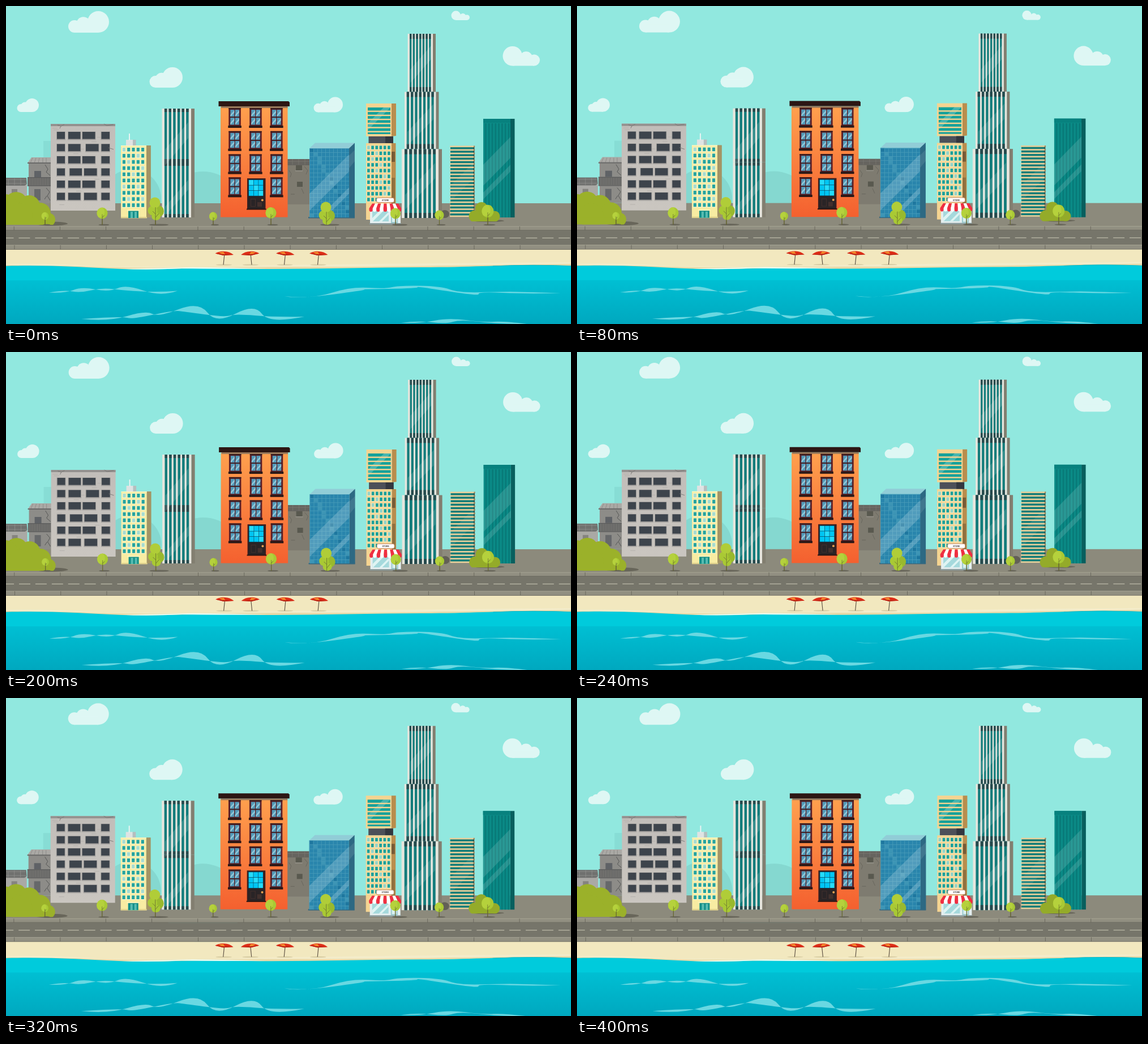
Recreate the animation shown at these times as an HTML page with a canvas. Size 998x561 px, loop 440 ms.

```html
<!DOCTYPE html>
<html lang="en">
<head>
<meta charset="utf-8">
<title>Seaside street</title>
<style>
html, body { margin: 0; width: 100%; height: 100%; overflow: hidden; background: #91e8df; }
canvas { display: block; }
</style>
</head>
<body>
<canvas id="stage" width="998" height="561"></canvas>
<script>
const g = document.getElementById('stage').getContext('2d');

const box = (color, x, y, w, h) => { g.fillStyle = color; g.fillRect(x, y, w, h); };
const shape = (color, d) => { g.fillStyle = color; g.fill(new Path2D(d)); };
const line = (color, width, d) => { g.strokeStyle = color; g.lineWidth = width; g.stroke(new Path2D(d)); };
const oval = (color, x, y, rx, ry = rx) => {
  g.fillStyle = color;
  g.beginPath();
  g.ellipse(x, y, rx, ry, 0, 0, 7);
  g.fill();
};
const fade = (y1, y2, from, to) => {
  const f = g.createLinearGradient(0, y1, 0, y2);
  f.addColorStop(0, from);
  f.addColorStop(1, to);
  return f;
};
const times = (n, draw) => { for (let i = 0; i < n; i++) draw(i); };

function cloud(x, y, w, h, flip) {
  g.save();
  g.translate(flip ? x + w : x, y);
  g.scale(flip ? -1 : 1, 1);
  const c = '#def7f4';
  oval(c, w - h / 2, h / 2, h / 2);
  oval(c, w * .37, h * .6, h * .33);
  oval(c, h * .29, h * .71, h * .29);
  box(c, h * .29, h * .62, w - h * .79, h * .38);
  g.restore();
}

function backdrop() {
  box('#91e8df', -9, -9, 1020, 380);
  cloud(110, 9, 72, 38);
  cloud(253.5, 108, 58.5, 36);
  cloud(19.5, 163, 38.5, 24);
  cloud(543.5, 160.5, 51.5, 27);
  cloud(786.5, 8.5, 32.5, 16.5, true);
  cloud(877.5, 71, 65.5, 34.5, true);
  oval('#85d8d0', 222, 340, 52);
  oval('#85d8d0', 348, 362, 70);
  box('#87ddd5', 66, 238, 14, 90);
  box('#8c8a7c', -9, 348, 1020, 42);
}

function oldHouses() {
  box('#aaa9a5', -9, 315, 46, 45);
  shape('#70716f', 'M-9 303H36L37 314 33 317H-9Z');
  line('#949491', .7, 'M-9 306H35M-9 313H36M4 306V316M15 304V316M26 304V316');
  box('#85837f', 10, 323, 10, 9);
  box('#8d8c88', 40, 275, 41, 73);
  shape('#aaa9a5', 'M45 267H80V277H38Z');
  line('#83827e', .7, 'M47 268L43 277M53 268L50 277M59 268L57 277M65 268V277M71 268V277');
  box('#6a6a69', 38, 276, 42, 2);
  box('#5f6266', 50, 291, 12, 11);
  box('#777673', 38, 302, 41, 15);
  times(14, i => box('#595a5a', 39 + i * 2.9, 303, .9, 13));
  box('#595a5a', 38, 302, 41, 1.2);
  box('#666665', 38, 316, 41, 2);
  box('#66686a', 50, 323, 11, 20);
  line('#565756', 1, 'M69 280L74 288 71 293 78 299M71 321L77 328 73 335 78 343M72 335L68 341');

  // Broken windows shift slightly between floors.
  const rows = [[90, 110, 135], [90, 110, 141], [90, 110, 135], [90, 112.5, 138], [90, 110, 135], [90, 110, 138]];
  box(fade(208, 361, '#c1bdb9', '#cac6c0'), 79, 208, 114, 153);
  box('#94918f', 79, 208, 114, 4);
  times(20, i => box('#b3afab', 82 + i * 47 % 99, 215 + i * 37 % 140, 9, .9));
  rows.forEach((xs, row) => {
    const y = 222 + row * 21.5;
    [...xs, 168.5].forEach((x, i) => {
      const w = [14, 21.5, 22.5, 14.5][i];
      box('#a5a29f', x - 1, y - .5, w + 2, 15);
      box('#3d444c', x, y, w, 12.6);
    });
  });
  line('#777573', .9, 'M91 210L97 212 103 209M97 212L95 216M173 208L178 211 190 209M181 250L190 253');

  box('#7e7b70', 497, 280, 40, 70);
  box('#66645f', 497, 270, 39, 11);
  line('#7d7b74', .7, 'M498 274H536M506 270V280M517 270V280M528 270V280');
  box('#59594f', 512, 281, 11, 9);
  box('#59594f', 514, 310, 10, 9);
  line('#68665d', 1, 'M500 290L504 296 502 302M527 283L533 290 530 297M503 332H510M522 322L526 331');
  box('#96938a', 511, 290, 13, 1.5);
}

function creamOffice() {
  box('#dfe3e3', 212, 236, 12, 11);
  box('#b6bebe', 224, 236, 5.5, 11);
  box('#e9f4f3', 217, 225, 2, 12);
  box('#9aa77a', 248, 246, 8, 127);
  box('#a49465', 248, 246, 7.5, 127);
  box('#f8eca2', 203, 246, 45, 128);
  box('#fff7c2', 203, 246, 45, 1.5);
  times(50, i => {
    const x = 205.8 + i % 5 * 8.3, y = 250 + (i / 5 | 0) * 10.9;
    box('#fff9d5', x - .8, y - .7, 6.8, 8.4);
    box(i * 7 % 11 < 2 ? '#a5dbd0' : '#25a39d', x, y, 5.2, 6.6);
  });
  box('#e0d28c', 203, 372, 46, 2.5);
  box('#fff7c2', 214, 359.5, 22, 2);
  box('#128e88', 216, 361.5, 18, 12.5);
  box('#59bcb2', 220, 363, 4, 11);
  box('#59bcb2', 227, 363, 4, 11);
}

function tower(x, y, w, h, n, side, rim, cap) {
  const inner = w - side - rim * 2, pitch = inner / (n - .42);
  box('#e6e5dd', x, y, w - side, h);
  box('#827e70', x + w - side, y, side, h);
  times(n, i => {
    const sx = x + rim + i * pitch, sw = pitch * .58;
    box('#137c7b', sx, y, sw, h);
    box('#27494c', sx, y, sw, cap);
    box('#27494c', sx, y + h - cap, sw, cap);
  });
}

function towers() {
  tower(275.5, 181, 57.5, 95, 6, 6, 4.4, 6);
  tower(275.5, 276, 57.5, 97, 6, 6, 4.4, 6);
  shape('#ffffff25', 'M281 253L322 205V233L281 281ZM281 354L322 307V324L281 370Z');
  tower(709.5, 49, 49.5, 103, 7, 5, 3.5, 9);
  tower(704, 151.5, 60.5, 101, 7, 5, 3.8, 9);
  tower(699, 252.5, 71, 121.5, 7, 6, 5, 9);
  shape('#ffffff24', 'M714 112L751 70V94L714 136ZM709 222L755 173V200L709 246ZM705 333L758 277V304L705 359Z');
}

function sashWindow(x, y) {
  box('#5c2028', x, y, 21.5, 33);
  box('#35191b', x, y, 21.5, 2);
  times(4, i => {
    const px = x + 3 + i % 2 * 8.5, py = y + 3 + (i >> 1) * 14;
    box('#5299b8', px, py, 7, 12.5);
    shape('#92c7d8', `M${px} ${py + 9}L${px + 7} ${py + 1}v4L${px} ${py + 12.5}Z`);
  });
  box('#3b191c', x + 2, y + 15.3, 17.5, 1.5);
  box('#2c1817', x - 1, y + 31, 23.5, 4);
}

function orangeHouse() {
  box(fade(178, 373, '#ffa04e', '#f4602f'), 379, 178, 118.5, 194.5);
  box('#9a7a5c', 380, 177, 117.5, 3);
  shape('#2c1714', 'M375.5 168H499L501 170V177H375.5Z');
  times(12, i => {
    if (i !== 10) sashWindow(393.3 + i % 3 * 36.9, 180 + (i / 3 | 0) * 40.8);
  });
  box('#3a1f1f', 426, 304, 32.5, 55);
  box('#292426', 428, 335, 28, 23);
  box('#0a3e55', 428, 306, 26.5, 29.5);
  times(9, i => box(i % 4 ? '#00c6f4' : '#24dcfa', 429 + i % 3 * 8.6, 307 + (i / 3 | 0) * 9.5, 8, 8.8));
  box('#43302d', 432, 340, 9, 14);
  box('#43302d', 444, 346, 8, 8);
  box('#292426', 433, 341, 7, 12);
  oval('#e7a052', 452.8, 342.5, 2);
  box('#2c1714', 425, 357.5, 34.5, 2);
}

function glassBlock() {
  box('#39697e', 534, 372, 82, 2.5);
  shape('#91cdd7', 'M536 251L546 241.5H616L606 251Z');
  shape('#2d6983', 'M606 251L616 241.5V373H606Z');
  box('#2985ac', 536, 251, 70, 122);
  times(16, i => box(i % 3 ? '#3d95b5' : '#1e779f', 536.5 + i * 3 % 10 * 7, 251 + i * 5 % 17 * 7.2, 6.5, 6.5));
  times(10, i => box('#4a9dba', 536 + i * 7, 251, .8, 122));
  times(17, i => box('#4a9dba', 536, 251 + i * 7.2, 70, .8));
  shape('#ffffff30', 'M536 331L606 262V292L536 361ZM553 373L606 320V331L564 373Z');
  shape('#ffffff18', 'M606 264L616 254V274L606 286Z');
}

function tanTower() {
  shape('#b98d4d', 'M681 172H689V229L681 230Z');
  box('#b98d4d', 681, 242, 7.5, 135);
  box('#775b37', 681, 257, 6, 18);
  box('#90703f', 681, 303, 6, 62);
  box('#f5d491', 636, 172, 45, 58);
  box('#4d5058', 640.5, 230, 43.5, 12);
  box('#33373f', 670, 230, 14, 12);
  box('#16a19a', 639, 179, 40, 47);
  shape('#ffffff38', 'M639 207L667 179H679L639 219Z');
  times(6, i => box('#f5d491', 638, 184.5 + i * 7.2, 42, 2.4));
  box('#f5d491', 636, 242, 45, 135);
  times(60, i => {
    const x = 638 + i % 6 * 7.2, y = 246.5 + (i / 6 | 0) * 10.2;
    box('#fff0c5', x - .7, y - .6, 6, 7.9);
    box(i * 5 % 13 < 2 ? '#94d2c6' : '#1c9f98', x, y, 4.7, 6.3);
  });
}

function shop() {
  box('#e5eff0', 643, 358, 54, 27);
  box('#8a9a9b', 642, 383, 56, 2.5);
  box('#a5d9dc', 647, 361, 29, 19);
  shape('#dff4f3', 'M647 374L660 361H667L648 380H647ZM659 380L676 363V368L664 380Z');
  box('#9bc9cd', 680, 361, 12, 22);
  box('#d9f0f0', 682, 363, 8, 18);
  times(9, i => {
    const t = 647 + i * 5.1, b = 641.5 + i * 6.3;
    shape(i % 2 ? '#ffffff' : '#ef2f42', `M${t} 348.5h5.1L${b + 6.3} 357v2.5a3.15 3.5 0 0 1-6.3 0V357Z`);
  });
  g.beginPath();
  g.roundRect(654.5, 338.5, 31, 8, 2.5);
  g.fillStyle = '#fff';
  g.fill();
  g.strokeStyle = '#c78863';
  g.lineWidth = 1;
  g.stroke();
  g.fillStyle = '#443b3b';
  g.font = 'bold 4px Roboto, sans-serif';
  g.textAlign = 'center';
  g.fillText('STORE', 670, 344);
}

function rightBlocks() {
  box('#2d5d57', 824, 248, 3.5, 124);
  box('#137c77', 785, 247, 40, 125);
  shape('#ffffff18', 'M785 317L825 277V305L785 345Z');
  times(21, i => {
    box('#ead09b', 784, 246.5 + i * 6.15, 42, 2.6);
    box('#a98b5d', 826, 246.5 + i * 6.15, 2.2, 2.6);
  });
  box('#085f5e', 891, 199, 7.5, 174);
  box('#0b8b87', 843, 199, 48, 174);
  times(8, i => box('#087a78', 846 + i * 5.8, 207, 2.7, 166));
  box('#07817e', 843, 199, 48, 7);
  shape('#ffffff20', 'M843 280L891 231V268L843 317ZM843 329L891 280V292L843 341Z');
}

function tree(x, y, r, foot = 386) {
  oval('#68665a', x + 3, foot, r, 1.3);
  box('#5d5136', x - .6, y, 1.2, foot - y);
  oval('#a9c934', x, y, r, r * 1.06);
  g.save();
  g.beginPath();
  g.ellipse(x, y, r, r * 1.06, 0, 0, 7);
  g.clip();
  oval('#b5d13c', x - r * .45, y - r * .2, r * .9, r);
  g.restore();
  line('#6d7430', .8, `M${x} ${y + r * .2}V${foot}M${x} ${y + r * .8}l${r * .35} ${-r * .4}`);
}

function tallTree(x, y) {
  oval('#68665a', x + 6, 386, 17, 1.6);
  box('#5d5136', x - .7, y, 1.4, 386 - y);
  oval('#99b92e', x + 6, y + 15, 9, 10);
  oval('#a9c934', x - 5, y + 14, 8.5);
  oval('#b0cd38', x - 1, y, 9.5);
  oval('#a9c934', x + 1, y + 24, 8, 7);
  line('#6d7430', .9, `M${x} ${y + 8}V386M${x} ${y + 26}l6 -7M${x} ${y + 20}l-5 -5`);
}

function bush(color, base, x1, x2, lobes) {
  g.save();
  g.beginPath();
  g.rect(-9, 0, 1020, base);
  g.clip();
  lobes.forEach(([x, y, r]) => oval(color, x, y, r));
  box(color, x1, base - 12, x2 - x1, 12);
  g.restore();
}

function greenery() {
  oval('#68665a', 80, 384, 29, 3.5);
  bush('#9bb12a', 386, -9, 80, [[18, 348, 20], [-2, 355, 23], [41, 353, 19], [60, 366, 19], [75, 377, 12], [25, 370, 22]]);
  tree(69, 370.5, 6.3, 386);
  tree(170, 365.5, 9.5);
  tallTree(264, 347);
  tree(366, 371, 7);
  tree(468, 365, 9.5);
  tallTree(566, 355);
  oval('#68665a', 696, 386, 13, 1.6);
  tree(688, 366, 9);
  oval('#626056', 775, 367, 8, 7);
  tree(765.5, 369, 8);
  oval('#68665a', 852, 379, 28, 2);
  bush('#94ab29', 380, 824, 866, [[840, 357, 11], [828, 371, 10.5], [848, 367, 12], [863, 371, 9.5]]);
  tree(851, 362, 10.5);
}

function road() {
  box('#918f81', -9, 389, 1020, 7);
  box('#a3a191', -9, 388.5, 1020, 1.2);
  box('#66645a', -9, 395.2, 1020, 1);
  box('#76756a', -9, 396, 1020, 26);
  times(36, i => box('#b5b3a2', -6.5 + i * 28.9, 408.6, 20, 1.4));
  box('#918f81', -9, 422, 1020, 8);
  box('#a3a191', -9, 421.5, 1020, 1.2);
  box('#737166', -9, 429, 1020, 1.4);
  times(12, i => {
    box('#67655b', 13.7 + i * 81.2, 389, .9, 7);
    box('#67655b', 14.5 + i * 81.2, 422, .9, 7);
  });
}

function parasol(x, flip) {
  g.save();
  g.translate(x, 0);
  oval('#d7cca2', 0, 456.6, 14, 1.1);
  line('#55483c', 1.1, flip ? 'M0 437L2 456.5' : 'M1 437L-1 456.5');
  g.scale(flip ? -1 : 1, 1);
  shape('#dd2d17', 'M-15.5 436.5Q-7 432 1 433Q10 433 17 439L7 439.5 -1 440Z');
  shape('#f48a2d', 'M-9 434.5L-1 433.5 3 439.5 0 440Z');
  shape('#b91f13', 'M-15.5 436.5L-1 440 17 439 3 438Z');
  g.restore();
}

function beach() {
  box('#f2e8bf', -9, 430, 1020, 40);
  shape('#e7d9a8', 'M-9 457Q60 455 130 459T300 461T500 460T720 459L998 454V470H-9Z');
  shape('#f4ecca', 'M-9 455Q70 453 150 458T400 459T998 452L998 455Q720 459 500 460T-9 457Z');
  const coast = 'C70 456 130 461 205 464C270 466 315 462 385 463C510 466 620 461 735 461C820 461 870 457 930 457Q970 457 1008 459';
  shape('#00cbdc', 'M-9 459' + coast + 'V490H-9Z');
  shape('#e8fbef', 'M205 463.7Q270 462 330 460.7Q390 461 460 463Q380 464.5 310 463Q250 466 205 463.7Z');
  line('#08b9ca', 1, 'M860 459Q930 455.5 1008 459');
  box(fade(484, 561, '#00bfd3', '#00a8bf'), -9, 484, 1020, 90);
  [[385], [432, true], [492.5], [551.5]].forEach(p => parasol(...p));
}

function waves() {
  const foam = '#69d8e2';
  shape(foam, 'M76 505.5Q104 507 119 501T158 500T197 498T243 502T303 502.5Q270 505 240 503.5T190 499.5T151 501.5T117 503.5T76 505.5Z');
  shape(foam, 'M492 512Q541 517 575 506T640 497T682 496T730 493.5T784 500T838 505T890 504T980 506.5Q920 508 877 506T835 508T780 503T727 496T675 499T632 500T580 508.5T492 512Z');
  shape(foam, 'M133 552Q181 557 214 547T258 543T305 535T356 541T405 543T452 543T527 548Q475 549 440 546T396 546T350 544T304 538T258 545T214 550T133 552Z');
  shape(foam, 'M698 559Q733 560 757 555T812 554T862 557T920 561Q870 561 836 557T790 557T752 558T698 559Z');
}

const layers = [
  backdrop, oldHouses, creamOffice, towers, glassBlock, tanTower, orangeHouse,
  rightBlocks, shop, road, greenery, beach, waves
];

// Camera shake: one small offset per 40 ms step.
const shake = [
  [0, 0], [.2, -.2], [-.1, -.4], [-.2, -.2], [-.1, -.5], [.6, 0],
  [.1, -.2], [-.5, -.4], [-.3, .3], [0, .3], [.4, .2]
];

function frame() {
  const step = Math.floor(performance.now() % 440 / 40);
  g.setTransform(1, 0, 0, 1, ...shake[step]);
  layers.forEach(draw => draw());
  requestAnimationFrame(frame);
}
frame();
</script>
</body>
</html>
```
